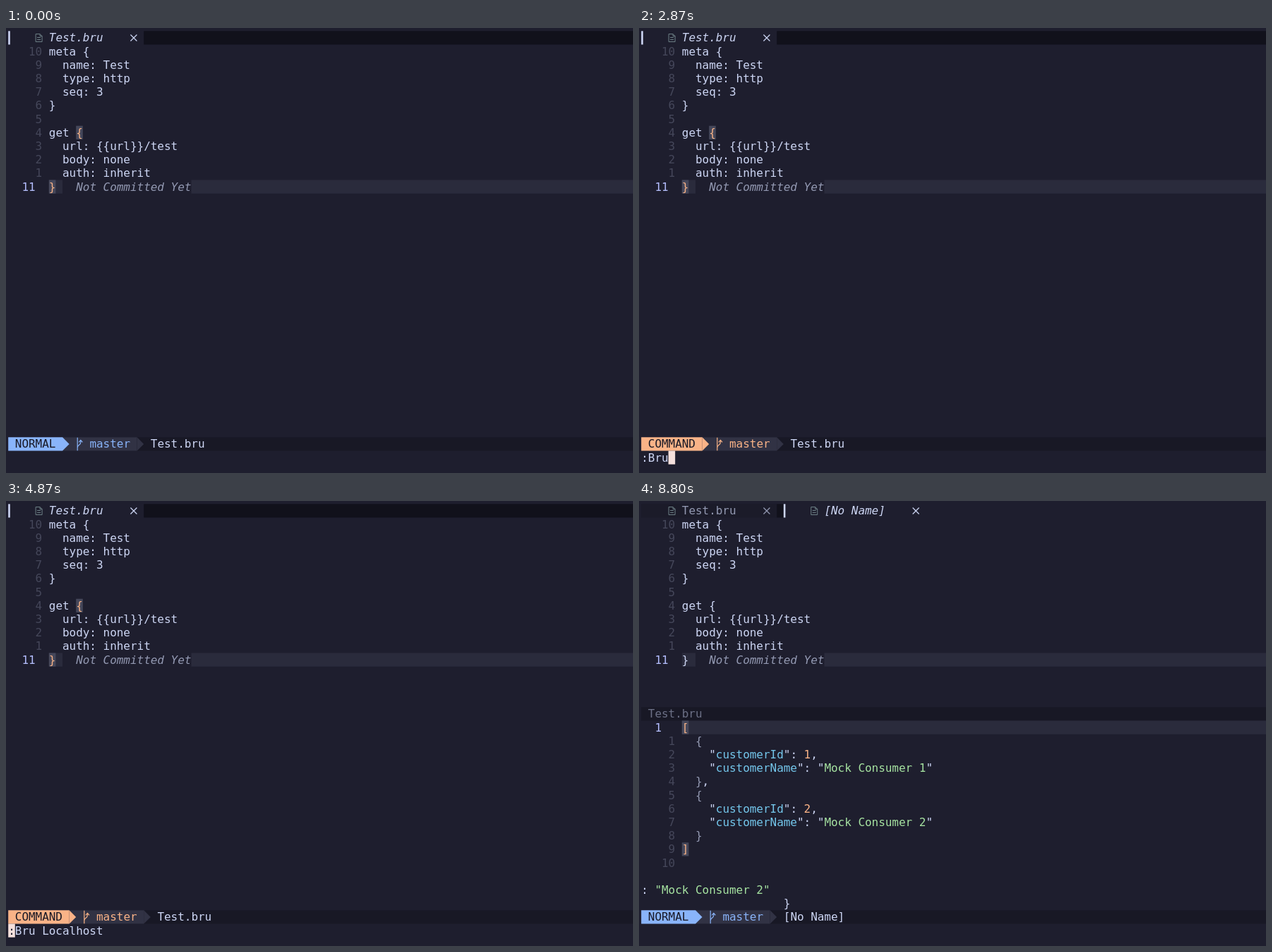
An HTML page with a canvas that plays this animation: 888x631 px, repeating every 9340 ms.

```html
<!DOCTYPE html>
<html lang="en">
<head>
<meta charset="utf-8">
<title>Editor session</title>
<style>
  html, body { margin: 0; width: 100%; height: 100%; overflow: hidden; background: #1e1e2e; }
  canvas { display: block; }
</style>
</head>
<body>
<canvas id="stage" width="888" height="631"></canvas>
<script>
const ctx = document.getElementById('stage').getContext('2d');
const LOOP = 9340, W = 888, H = 631, CELL = 9.6, LINE = 19.2, END = 93;
const FONT = '15.95px "DejaVu Sans Mono", "Noto Sans Mono", monospace';
const C = {
  base: '#1e1e2e', mantle: '#181825', crust: '#11111b', surface: '#313244', raised: '#45475a',
  line: '#2a2b3c', text: '#cdd6f4', dim: '#6c7086', soft: '#9399b2', blue: '#89b4fa',
  peach: '#fab387', green: '#a6e3a1', sky: '#74c7ec', lavender: '#b4befe', rose: '#f5e0dc',
  icon: '#6d8086', ghost: '#292a3b', tab: '#1b1b29'
};
const X = col => 3.2 + col * CELL;
const Y = row => 4.3 + row * LINE;

function fill(row, col, cols, color, rows = 1) {
  ctx.fillStyle = color;
  ctx.fillRect(X(col), Y(row), cols * CELL, rows * LINE);
}

// Takes alternating text and colour pairs.
function put(row, col, ...parts) {
  for (let i = 0; i < parts.length; i += 2) {
    ctx.fillStyle = parts[i + 1];
    ctx.fillText(parts[i], X(col), Y(row) + 15);
    col += parts[i].length;
  }
}

function italic(row, col, text, color) {
  ctx.font = 'italic ' + FONT;
  put(row, col, text, color);
  ctx.font = FONT;
}

function block(row, col, char, back, color) {
  fill(row, col, 1, back);
  put(row, col, char, color);
}
const match = (row, col, char) => block(row, col, char, C.raised, C.peach);
const cursor = (row, col, char = ' ') => block(row, col, char, C.rose, C.base);

function stroke(path, color, width = 1.2) {
  ctx.strokeStyle = color;
  ctx.lineWidth = width;
  ctx.stroke(new Path2D(path));
}

function tab(col, name, active) {
  const color = active ? C.text : C.soft, x = X(col + 4), end = col + 6 + name.length;
  if (active) {
    fill(0, col, 0.27, color);
    italic(0, col + 6, name, color);
  } else {
    put(0, col + 6, name, color);
  }
  stroke(`M${x + .5} 8.5h6l3 3v8h-9zM${x + 6.5} 8.5v3h3M${x + 2.5} 13.5h5M${x + 2.5} 16.5h5`, C.icon, 1);
  const cross = X(end + 4) + 4.9;
  stroke(`M${cross - 4.5} 9.5l9 9m0-9l-9 9`, color);
}

function arrow(row, col, color) {
  const x = X(col), y = Y(row);
  ctx.fillStyle = color;
  ctx.fill(new Path2D(`M${x} ${y}L${x + CELL} ${y + LINE / 2}L${x} ${y + LINE}z`));
}

function status(row, mode, color, file) {
  const col = mode.length + 2, x = X(col + 2), y = Y(row);
  fill(row, 0, END, C.mantle);
  fill(row, 0, col + 11, C.surface);
  fill(row, 0, col, color);
  arrow(row, col, color);
  arrow(row, col + 11, C.surface);
  put(row, 1, mode, C.mantle);
  stroke(`M${x + 2} ${y + .5}v18.5M${x + 2} ${y + 15}q0-2.5 2.3-4t2.3-4v-3` +
         `M${x + 4} ${y + 7}l2.6-3 2.6 3`, color);
  put(row, col + 4, 'master', color);
  put(row, col + 13, file, C.text);
}

const source = ['meta {', '  name: Test', '  type: http', '  seq: 3', '}', '', 'get {',
  '  url: {{url}}/test', '  body: none', '  auth: inherit'];

function buffer(active) {
  source.forEach((text, i) => {
    put(i + 1, 3, String(10 - i).padStart(2), C.raised, ' ', C.text, text, C.text);
  });
  put(11, 2, '11', C.lavender);
  fill(11, 6, 2, C.line);
  fill(11, 27, END - 27, C.line);
  italic(11, 10, 'Not Committed Yet', C.soft);
  if (active) {
    match(7, 10, '{');
    match(11, 6, '}');
  } else {
    put(11, 6, '}', C.text);
  }
}

const customer = id => `Mock Consumer ${id}`;

function editor(t) {
  fill(0, 20, END - 20, C.crust);
  tab(0, 'Test.bru', true);
  buffer(true);
  if (t < 2270) {
    if (t >= 1130) cursor(11, 6, '}');
    status(30, 'NORMAL', C.blue, 'Test.bru');
    return;
  }
  status(30, 'COMMAND', C.peach, 'Test.bru');
  const typed = [2530, 2730, 2870, 3070].filter(at => t >= at).length;
  const command = t < 3130 ? ':Bru '.slice(0, typed + 1) : ':Bru Localhost';
  put(31, 0, command, C.text);
  if (t >= 4870) cursor(31, 0, ':');
  else cursor(31, command.length);
  if (t >= 3130 && t < 4870) {
    fill(29, 4, 16, C.raised);
    fill(30, 4, 16, C.line);
    put(29, 5, 'Localhost', C.soft);
    put(30, 5, 'Test', C.soft);
  }
}

function leftover() {
  put(28, 0, ': ', C.text, `"${customer(2)}"`, C.green);
  put(29, 21, '}', C.text);
}

function summary(row, col) {
  put(row, col, 'Requests:    ', C.text, '1 passed', C.green, ', 1 total', C.text);
  put(row + 1, col + 30, 'Tests:       ', C.text, '0 passed', C.green, ', 0 total', C.text);
  put(row + 2, col + 60, 'Assertions:  ', C.text, '0 passed', C.green, ',', C.text);
}

function output() {
  status(6, 'COMMAND', C.peach, 'Test.bru');
  fill(7, 0, 21, C.surface, 2);
  fill(8, 0, END, C.surface, 13);
  put(7, 0, 'Test', C.green, ' (200 OK) - 15 ms', C.dim);
  summary(9, 21);
  put(13, 0, 'ts - 15 ms', C.ghost);
  summary(15, 10);
  put(19, 0, 'n/bruno_output.json', C.ghost);
  put(20, 19, '[', C.text);
  put(21, 22, '{', C.text);
  put(22, 27, '"customerId"', C.blue, ': 1,', C.text);
  put(23, 47, '"customerName"', C.blue, ': ', C.text, `"${customer(1)}"`, C.green);
  put(24, 82, '},', C.text);
  put(25, 86, '{', C.text);
  put(26, 91, '"c', C.blue);
  leftover();
  put(30, 22, ']', C.text);
}

function result(t) {
  fill(0, 0, 20, C.tab);
  fill(0, 20, 1, C.crust);
  tab(0, 'Test.bru', false);
  tab(21, '[No Name]', true);
  buffer(false);
  fill(15, 0, END, C.mantle);
  put(15, 1, 'Test.bru', C.dim);
  fill(16, 6, END - 6, C.line);
  put(16, 2, '1', C.lavender);
  for (let n = 1; n <= 10; n++) put(16 + n, 3, String(n).padStart(2), C.raised);
  for (const id of [1, 2]) {
    const row = 13 + id * 4;
    put(row, 8, '{', C.soft);
    put(row + 1, 10, '"', C.text, 'customerId', C.sky, '": ', C.text, String(id), C.peach, ',', C.text);
    put(row + 2, 10, '"', C.text, 'customerName', C.sky, '": "', C.text, customer(id), C.green, '"', C.text);
    put(row + 3, 8, '}', C.soft, id === 1 ? ',' : '', C.text);
  }
  if (t < 8800) cursor(16, 6, '[');
  else match(16, 6, '[');
  match(25, 6, ']');
  leftover();
  status(30, 'NORMAL', C.blue, '[No Name]');
}

const start = performance.now();
function draw() {
  const t = (performance.now() - start) % LOOP;
  ctx.font = FONT;
  ctx.fillStyle = C.base;
  ctx.fillRect(0, 0, W, H);
  if (t < 6130) editor(t);
  else if (t < 6200) output();
  else result(t);
  requestAnimationFrame(draw);
}
draw();
</script>
</body>
</html>
```
